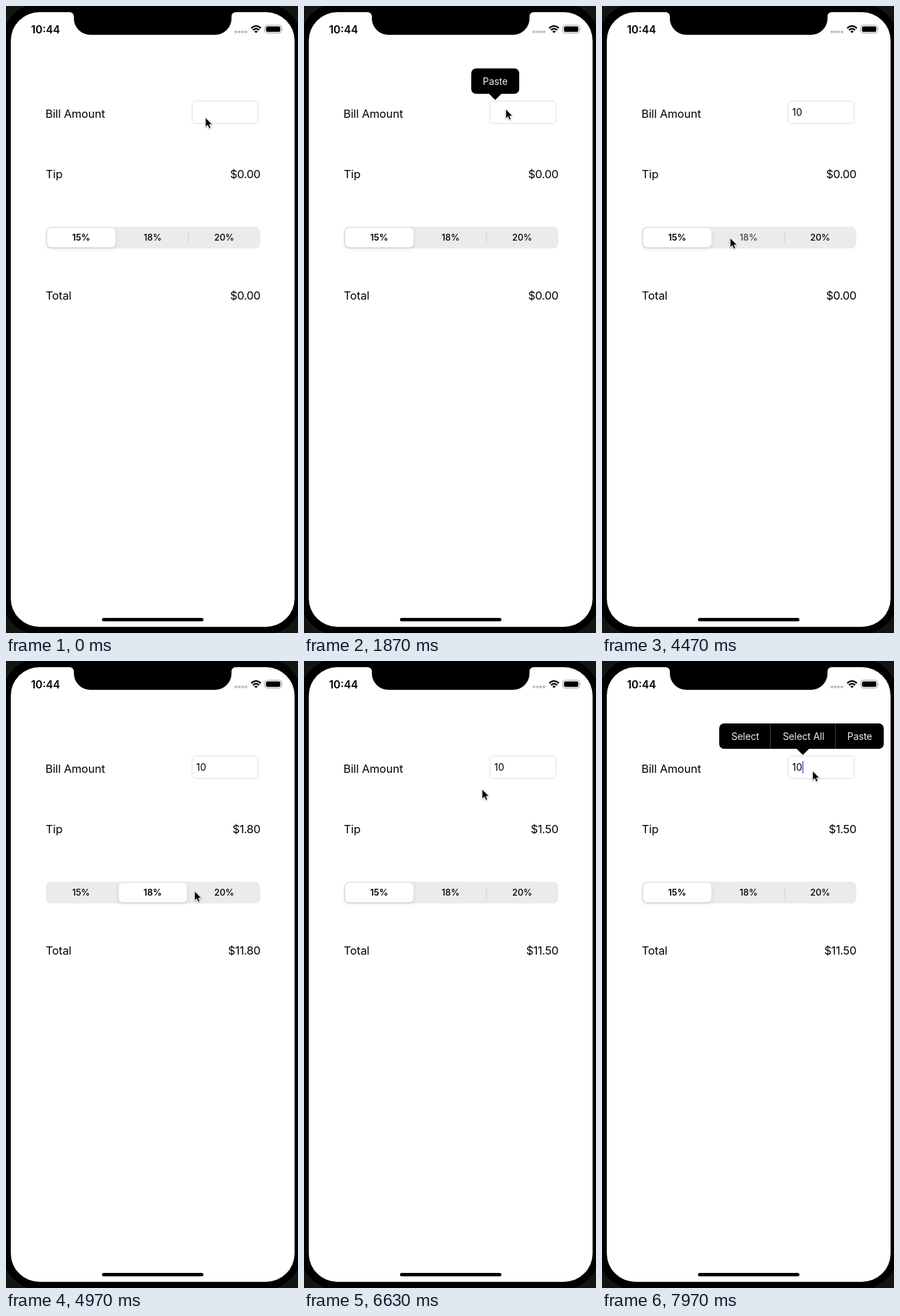
Recreate the animation shown at these times as an HTML page. Size 426x914 px, loop 8 s.

```html
<!DOCTYPE html>
<html lang="en">
<head>
<meta charset="utf-8">
<title>Tip calculator</title>
<style>
  html, body { margin: 0; width: 100%; height: 100%; overflow: hidden; background: #000; }
  svg { display: block; width: 100vw; height: 100vh; }
  text { font-family: Inter, Roboto, "Liberation Sans", sans-serif; white-space: pre; }
  .label, .money { font-size: 16.5px; letter-spacing: -.1px; }
  .money { letter-spacing: -.35px; text-anchor: end; }
  .seg { font-size: 13px; font-weight: 500; text-anchor: middle; letter-spacing: -.1px; }
  .rule { fill: #d2d2d5; }
  .menu text { font-size: 14px; fill: #ececec; text-anchor: middle; letter-spacing: -.1px; }
  .menu line { stroke: #3c3c3c; }
  #pill { fill: #fff; filter: drop-shadow(0 1px 1px rgba(0,0,0,.06)) drop-shadow(0 2px 3px rgba(0,0,0,.1)); }
  #cursor { filter: drop-shadow(0 1px 1px rgba(0,0,0,.3)); }
</style>
</head>
<body>
<svg viewBox="0 0 426 914" preserveAspectRatio="none">
  <!-- device -->
  <rect width="426" height="914" fill="#141414"/>
  <rect x="-6" y="-4" width="438" height="921" rx="56"/>
  <rect x="7" y="9" width="414" height="896" rx="41.5" fill="#fff"/>
  <path d="M93 8V9A6 6 0 0 1 99 15V18A24 24 0 0 0 123 42H305A24 24 0 0 0 329 18V15A6 6 0 0 1 335 9V8Z"/>
  <rect x="140" y="892" width="148" height="5" rx="2.5"/>

  <!-- status bar -->
  <text x="36.5" y="39.5" font-size="15.5" font-weight="600">10:44</text>
  <path d="M333.5 37.8H352" stroke="#bfbfc1" stroke-width="3.6" stroke-dasharray="3.8 1.1"/>
  <g fill="none" stroke="#000" stroke-width="2.3">
    <path d="M357.8 32.3Q364.8 26 371.8 32.3"/>
    <path d="M360.3 35.1Q364.8 31.2 369.3 35.1"/>
  </g>
  <path d="M362.2 36.9Q364.8 34.9 367.4 36.9L364.8 39.6Z"/>
  <rect x="377.5" y="28" width="24.5" height="11.5" rx="3.4" fill="none" stroke="#a4a4a4"/>
  <rect x="379.3" y="29.8" width="20.9" height="7.9" rx="2"/>
  <path d="M403.2 32Q405 33.8 403.2 35.6Z" fill="#a4a4a4"/>

  <!-- form -->
  <text class="label" x="57.5" y="162.5">Bill Amount</text>
  <text class="label" x="58" y="251">Tip</text>
  <text class="label" x="58" y="427.5">Total</text>
  <text class="money" id="tip" x="371" y="251"></text>
  <text class="money" id="total" x="371" y="427.5"></text>
  <rect x="271.5" y="138.5" width="96.5" height="33" rx="5" fill="#fff" stroke="#e0e0e0"/>
  <text id="bill" x="277.5" y="160.3" font-size="14"></text>
  <rect id="caret" y="146" width="2" height="18" rx="1" fill="#4664dc"/>

  <!-- segmented control -->
  <rect x="58" y="321.5" width="313" height="32" rx="8" fill="#ebebed"/>
  <g id="rules"></g>
  <rect id="pill" y="323.4" width="99.6" height="28.4" rx="6.5"/>
  <g id="segs"></g>

  <!-- edit menus -->
  <g class="menu" id="paste">
    <rect x="244" y="91" width="70" height="37" rx="7"/>
    <path d="M269.5 127.5H288.5L279 137Z"/>
    <text x="279" y="114.8">Paste</text>
  </g>
  <g class="menu" id="edit">
    <rect x="171" y="91" width="240" height="37" rx="7"/>
    <path d="M283.5 127.5H302.5L293 137Z"/>
    <line x1="245.5" y1="91" x2="245.5" y2="128"/>
    <line x1="340.5" y1="91" x2="340.5" y2="128"/>
    <text x="209" y="114.8">Select</text>
    <text x="294" y="114.8">Select All</text>
    <text x="376" y="114.8">Paste</text>
  </g>

  <path id="cursor" d="M0 0V14.2L3.2 11.2L5.3 16.1L7.8 15L5.8 10.3H10.1Z" stroke="#fff" stroke-width=".9"/>
</svg>
<script>
  const LOOP = 8000, SLIDE = 280, HOLD = 100, FADE = 200, STEP = 104.4;
  const RATES = [15, 18, 20];
  const $ = id => document.getElementById(id);
  const [tip, total, bill, caret, pill, paste, edit, cursor] =
    ['tip', 'total', 'bill', 'caret', 'pill', 'paste', 'edit', 'cursor'].map($);

  $('segs').innerHTML = RATES.map((r, i) =>
    `<text class="seg" x="${109.5 + STEP * i}" y="342.2">${r}%</text>`).join('');
  $('rules').innerHTML = [0, 1].map(i =>
    `<rect class="rule" x="${161.3 + STEP * i}" y="329" width="1" height="17.5"/>`).join('');
  const segs = [...$('segs').children], rules = [...$('rules').children];

  const clamp = u => Math.min(1, Math.max(0, u));
  const easeOut = u => 1 - (1 - clamp(u)) ** 3;
  const fade = (t, from, to = Infinity) => Math.min(clamp((t - from) / FADE), clamp((to + FADE - t) / FADE));
  const money = v => '$' + v.toFixed(2);

  const home = { x: 291, y: 162.5 };
  const moves = [
    { from: 30, to: 130, x: 294.3, y: 150 },
    { from: 3535, to: 4330, x: 187, y: 338 },
    { from: 4800, to: 5130, x: 286.2, y: 335 },
    { from: 5740, to: 6130, x: 112, y: 337 },
    { from: 6330, to: 7130, x: 307.2, y: 160, bow: -22 }
  ];
  const taps = [{ at: 4400, seg: 1 }, { at: 5330, seg: 2 }, { at: 6170, seg: 0 }];
  const keys = [2570, 2800];
  const touches = [0, ...keys, 7470];

  function pointer(t) {
    let { x, y } = home;
    for (const m of moves) {
      const p = easeOut((t - m.from) / (m.to - m.from));
      x += (m.x - x) * p;
      y += (m.y - y) * p + (m.bow || 0) * 4 * p * (1 - p);
    }
    return [x, y];
  }

  function caretAlpha(t) {
    const focused = (t >= 100 && t < moves[1].from) || t >= 7330;
    const last = touches.filter(s => s <= t).pop();
    return focused ? clamp((540 - (t - last) % 1000) / 50) : 0;
  }

  function render(t) {
    cursor.setAttribute('transform', `translate(${pointer(t)})`);

    bill.textContent = '10'.slice(0, keys.filter(k => k <= t).length);
    caret.setAttribute('x', 277.5 + bill.getComputedTextLength());
    caret.style.opacity = caretAlpha(t);
    paste.style.opacity = fade(t, 1570, keys[0]);
    edit.style.opacity = fade(t, 7500);

    const done = taps.filter(p => t >= p.at + HOLD);
    const held = taps.find(p => t >= p.at && t < p.at + HOLD);
    const picked = done.length ? done[done.length - 1].seg : 0;
    const pos = done.reduce((p, { at, seg }) => p + (seg - p) * easeOut((t - at - HOLD) / SLIDE), 0);

    pill.setAttribute('x', 60.1 + STEP * pos);
    rules.forEach((r, i) => r.style.opacity = clamp((Math.abs(pos - i - .5) - .6) * 2.5));
    segs.forEach((s, i) => {
      s.style.fontWeight = i === picked ? 600 : 500;
      s.style.opacity = held && held.seg === i ? .7 : 1;
    });

    const amount = done.length ? 10 : 0;
    const extra = amount * RATES[picked] / 100;
    tip.textContent = money(extra);
    total.textContent = money(amount + extra);
  }

  const start = performance.now();
  function frame() {
    render((performance.now() - start) % LOOP);
    requestAnimationFrame(frame);
  }
  frame();
</script>
</body>
</html>
```
